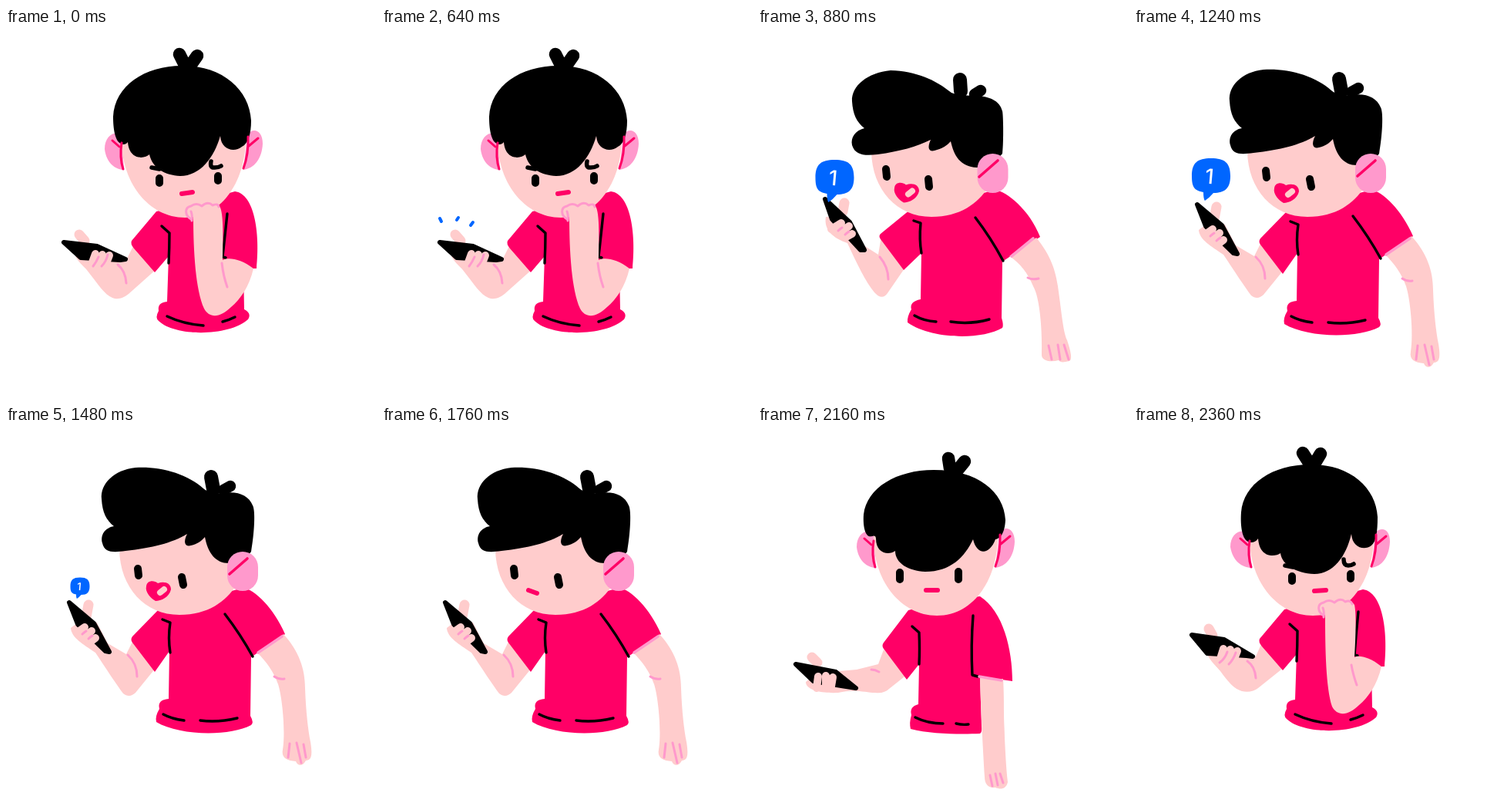
Recreate the animation shown at these times as an HTML page. Size 480x480 px, loop 2400 ms.

```html
<!DOCTYPE html>
<html lang="en">
<head>
<meta charset="utf-8">
<title>Waiting for a message</title>
<style>
  html, body { margin: 0; width: 100%; height: 100%; overflow: hidden; background: #fff; }
  svg { display: block; width: 100vw; height: 100vh; }
  path { stroke-linecap: round; stroke-linejoin: round; }
  text { font: 500 27px Inter, sans-serif; fill: #fff; text-anchor: middle; }
</style>
</head>
<body>
<svg id="stage" viewBox="0 0 480 480">
  <g id="body"></g>
  <g id="smile">
    <path fill="#f06" d="M182,208 C183,200 192,200 197,204 C206,201 214,204 214,212 C212,222 201,227 194,227 C188,224 180,215 182,208Z"/>
    <path stroke="#fcc" stroke-width="8" d="M200,216 L205,212"/>
  </g>
  <g id="sparks" fill="none" stroke="#06f" stroke-width="4">
    <path d="M75,247 L77,251 M99,246 L97,249 M118,252 L115,256"/>
  </g>
  <g id="bubble">
    <path fill="#06f" d="M100,169 C118,169 125,175 125,192 C125,208 118,214 103,214 Q98,220 92,224 Q90,222 90,213 C78,211 75,206 75,192 C75,175 82,169 100,169Z"/>
    <text x="98" y="202" transform="rotate(5 98 192)">1</text>
  </g>
</svg>
<script>
const SKIN = '#fcc', RED = '#f06', PINK = '#f9c', INK = '#000';
const LOOP = 2400, TICK = 40;
const byId = id => document.getElementById(id);
const fill = c => ({ fill: c });
const line = (c, w) => ({ fill: 'none', stroke: c, 'stroke-width': w });

// Poses: W worried, V worried leaning right, F front with arm down,
// S side view, T side view with arms swung out. A missing pose uses its base.
const base = { V: 'W', F: 'W', T: 'S' };

const parts = [
  // arm holding the phone
  { hand: 1, ...fill(SKIN),
    W: 'M165,283 L157,299 L138,300 L120,295 L105,292 L90,296 C95,306 103,310 108,318 C120,333 128,346 138,350 C145,353 153,350 159,345 L196,312Z',
    V: 'M165,283 L158,299 L140,300 L120,290 L105,286 L92,290 C97,303 105,310 112,318 C122,332 130,341 140,344 C148,346 156,344 161,340 L196,312Z',
    F: 'M163,290 L156,309 L128,316 L105,318 L80,318 L62,332 C62,342 80,347 104,346 C125,341 140,346 152,346 C160,347 166,345 170,341 L194,322Z',
    S: 'M164,280 L156,296 L132,282 L118,255 L100,250 L84,262 C85,275 100,283 116,294 C130,315 143,335 152,347 C158,352 164,350 168,346 L194,314Z',
    T: 'M160,270 L156,294 L134,280 L122,252 L104,246 L88,245 C85,262 98,273 116,279 C128,305 140,330 151,343 C158,351 164,350 168,344 L190,312Z' },
  { hand: 1, ...line(PINK, 3),
    W: 'M145,307 Q155,315 156,331', V: 'M147,305 Q157,312 158,327', F: 'M147,316 Q152,316 157,319',
    S: 'M158,297 Q170,308 170,325', T: 'M158,297 Q169,310 169,326' },
  { hand: 1, ...line(SKIN, 13),
    W: 'M95,268 L102,276', V: 'M97,263 L102,272', F: 'M70,300 L77,307',
    S: 'M107,232 L104,248', T: 'M112,227 L110,238' },
  { hand: 1, fill: INK, stroke: INK, 'stroke-width': 6,
    W: 'M75,278 L118,283 L155,300 L148,301 L97,298Z',
    V: 'M75,271 L117,277 L154,299 L146,298 L95,295Z',
    F: 'M49,309 L101,319 L127,340 L108,337 L72,331Z',
    S: 'M82,229 L114,256 L134,293 L129,292 L93,257Z',
    T: 'M87,222 L119,252 L138,288 L133,288 L96,248Z' },
  { hand: 1, ...line(SKIN, 10),
    W: 'M116,293 L112,304 M125,294 L121,306 M134,295 L129,308',
    V: 'M116,289 L112,302 M125,290 L121,303 M134,292 L129,305',
    F: 'M78,325 L76,340 M88,324 L88,340 M97,326 L95,338',
    S: 'M102,261 L92,268 M111,266 L100,275 M116,275 L108,281',
    T: 'M108,253 L95,261 M118,257 L106,266 M122,267 L113,272' },
  { hand: 1, ...line(PINK, 3),
    W: 'M120,297 Q117,304 113,309 M132,294 Q130,303 124,309',
    V: 'M121,293 Q118,302 111,307 M132,294 Q129,303 123,309',
    F: '',
    S: 'M104,266 Q101,268 99,270 M112,272 Q109,274 107,276',
    T: 'M109,259 Q106,261 104,263 M118,264 Q115,266 113,268' },

  // shirt
  { ...fill(RED),
    W: 'M195,238 L163,276 Q161,280 166,286 L193,317 L211,296 L209,355 Q196,356 198,367 Q193,376 198,380 C220,401 290,400 314,378 Q319,370 309,365 L308,312 L325,312 C330,265 322,215 297,212 L250,225Z',
    F: 'M195,239 L163,281 Q160,285 163,289 L193,329 L209,309 L208,361 Q196,364 199,375 Q196,385 198,393 C225,400 265,400 288,399 Q291,397 290,390 L288,325 L330,331 C330,290 318,240 288,221 L250,225Z',
    S: 'M200,236 L164,273 Q161,277 164,281 L193,319 L212,292 L211,354 Q196,355 199,367 Q193,377 195,384 C225,402 290,403 318,388 Q322,385 317,376 L318,300 L362,270 C347,235 322,212 308,210 L250,225Z',
    T: 'M197,236 L159,267 Q156,270 159,274 L189,314 L212,292 L211,352 Q196,355 199,365 Q193,375 194,382 C225,404 290,405 317,389 Q319,386 316,376 L317,303 L366,271 C352,235 322,212 308,210 L250,225Z' },
  { ...line(INK, 3.4),
    W: 'M202,257 L212,266 Q212,285 211,305 M287,241 Q284,270 281,297 L285,298 M209,374 Q230,384 256,386 M281,381 Q289,379 297,375',
    V: 'M202,257 L212,266 Q212,285 211,305 M291,241 Q288,270 286,297 L290,298 M209,374 Q230,384 256,386 M281,381 Q289,379 297,375',
    F: 'M200,260 L209,268 Q210,290 209,309 M279,246 Q276,285 278,323 L285,325 M204,378 Q220,386 240,386 M257,386 Q265,388 273,387',
    S: 'M203,251 L213,255 Q210,275 213,294 M284,244 Q304,270 320,299 L320,299 M204,374 Q215,380 231,382 M252,382 Q275,385 300,379',
    T: 'M202,250 L211,253 Q209,275 212,292 M282,246 Q302,272 318,302 L318,302 M203,373 Q215,380 231,381 M250,381 Q275,385 300,378' },

  // head, front view
  { ...fill(PINK),
    W: 'M150,138 C140,133 128,140 128,157 C130,175 142,184 153,184Z M313,138 C322,128 333,134 333,150 C332,170 322,182 308,184Z',
    V: 'M148,138 C137,133 125,140 125,157 C128,175 140,184 153,184Z M313,138 C322,130 332,134 332,150 C331,170 322,182 308,184Z' },
  { ...fill(SKIN),
    W: 'M150,140 C148,200 185,246 232,246 C282,246 312,195 311,140Z' },
  { ...line(INK, 16.5),
    W: 'M225,34 L231,46 M248,36 L241,46', V: 'M219,35 L226,46 M242,36 L236,46', F: 'M247,42 L249,55 M268,46 L259,57' },
  { ...fill(INK),
    W: 'M149,150 C140,146 139,125 139,115 C141,75 180,49 228,49 C280,48 316,80 318,120 C318,138 314,150 306,154 C296,162 279,158 278,140 C270,168 252,192 226,192 C206,191 190,182 186,164 C180,170 160,172 158,148 C156,151 152,152 149,150Z',
    V: 'M148,150 C139,146 138,125 139,112 C142,75 180,50 228,50 C280,49 314,80 316,118 C316,138 314,150 308,155 C299,162 283,158 282,140 C275,170 258,192 234,192 C210,191 192,180 190,165 C183,170 163,172 161,146 C158,151 152,152 148,150Z',
    F: 'M148,143 C139,146 136,130 137,115 C141,80 180,57 228,57 C285,57 319,85 321,122 C320,140 314,146 308,147 C300,168 284,168 279,147 C268,170 250,189 217,189 C195,188 178,178 178,162 C170,168 153,166 153,146 C153,142 150,142 148,143Z' },
  { ...line(RED, 3),
    W: 'M138,146 L147,154 M150,149 Q147,168 152,183 M327,143 L315,153 M314,141 Q315,163 308,182' },
  { ...line(INK, 5.5),
    W: 'M189,181 L199,183 M266,173 Q264,182 271,181 Q276,181 279,179',
    V: 'M196,181 L206,183 M272,173 Q272,181 278,181 Q282,181 285,179',
    F: '' },

  // head, side view
  { ...fill(SKIN),
    S: 'M147,160 C148,210 180,245 225,245 C262,245 285,228 300,205 L300,140 L150,140Z' },
  { ...line(INK, 18),
    S: 'M266,66 L269,82', T: 'M262,67 L263,82' },
  { ...line(INK, 14.5),
    S: 'M291,78 L282,83', T: 'M289,81 L281,86' },
  { ...fill(INK),
    S: 'M140,130 C128,132 122,142 125,152 C128,165 140,164 155,162 C190,158 215,152 235,140 C229,152 233,157 240,155 C248,153 254,149 258,144 C262,165 272,178 289,178 C300,178 312,172 318,163 C322,140 324,110 320,103 C315,90 300,84 283,87 C270,88 262,86 256,81 C235,62 200,52 168,54 C140,57 122,75 124,95 C125,112 130,122 140,130Z',
    T: 'M138,130 C126,133 120,142 122,152 C126,165 138,166 155,164 C185,160 205,154 224,145 C219,156 222,161 229,159 C238,157 246,152 250,147 C254,165 262,180 284,181 C297,181 310,172 317,163 C319,145 318,110 317,108 C314,95 302,90 288,88 C270,88 258,87 251,84 C230,67 205,56 172,55 C142,58 121,75 122,95 C123,112 128,122 138,130Z' },
  { ...line(PINK, 40), S: 'M307,183 L307,194', T: 'M304.5,183 L304.5,194' },
  { ...line(RED, 3.6), S: 'M290,192 L313,172', T: 'M287,193 L311,172' },

  // eyes and closed mouth
  { ...line(INK, 10),
    W: 'M199,195 L199,201 M275,192 L275,198', V: 'M205,195 L205,201 M281,192 L281,198',
    F: 'M184,190 L184,199 M260,189 L260,199',
    S: 'M171,185 L172,194 M228,196 L230,206', T: 'M166,183 L167,193 M221,196 L222,206' },
  { mouth: 1, ...line(RED, 6),
    W: 'M228,215 L242,213', V: 'M234,214 L249,213', F: 'M218,213 L233,213',
    S: 'M190,213 L201,217', T: 'M185,213 L196,217' },

  // free arm
  { ...fill(SKIN),
    W: 'M321,312 C316,335 304,352 292,362 C278,376 264,377 257,364 C246,340 243,290 243,245 C233,250 230,232 240,231 C252,223 272,224 278,233 C283,245 281,285 281,301 C288,297 305,299 321,312Z',
    V: 'M321,312 C316,335 304,352 292,362 C278,376 264,377 257,364 C249,340 248,290 248,245 C238,250 235,232 245,229 C256,221 278,221 286,232 C289,245 287,285 286,300 C291,297 305,299 321,312Z',
    F: 'M318,328 C319,345 319,360 319,372 C319,385 320,395 320,405 C321,425 322,445 324,462 C322,471 315,472 308,469 C300,470 294,466 294,455 C292,420 289,370 288,327 C298,328 308,329 318,328Z',
    S: 'M360,270 C380,292 388,315 388,340 C389,370 392,395 395,410 C398,428 396,434 389,434 C385,442 378,441 376,435 C364,434 357,430 359,420 C363,395 358,350 353,335 C347,318 337,305 326,294Z',
    T: 'M361,272 C380,295 386,315 389,335 C394,370 396,395 401,405 C406,420 408,430 404,432 C396,434 392,434 390,431 C380,434 369,432 368,425 C369,395 366,350 357,335 C350,318 340,305 326,296Z' },
  { ...line(PINK, 3),
    W: 'M240,248 C232,243 231,233 240,231 Q247,226 254,231 Q262,224 268,230 Q275,227 276,232 M240,238 Q242,243 241,250',
    V: 'M246,246 C238,241 237,231 246,229 Q253,224 260,229 Q268,222 274,228 Q281,225 283,231 M245,236 Q247,241 246,248',
    F: '', S: '' },
  { ...line(PINK, 3),
    W: '', F: 'M301,453 L304,467 M308,451 L311,466 M314,451 L318,463',
    S: 'M368,412 L366,430 M377,411 L383,437 M386,413 L389,430',
    T: 'M377,412 L381,430 M389,411 L392,430 M397,411 L403,430' },
  { ...line(PINK, 3),
    W: 'M280,305 Q282,322 287,336', V: 'M282,310 Q284,322 289,336', F: '',
    S: 'M348,325 Q354,329 361,328', T: 'M350,324 Q356,327 364,325' },
  { ...line(PINK, 3.6),
    W: '', F: 'M287,325 L316,330', S: 'M327,294 L358,273', T: 'M329,296 L357,273' },
];

// [time, pose, next pose, mix, mix of the phone arm]
const poses = [
  [0, 'W'], [760, 'W', 'F', .4, .1], [800, 'W', 'F', .94, .2],
  [840, 'S', 'T', .6], [880, 'T'],
  [920, 'T', 'S', .3], [960, 'T', 'S', .6], [1000, 'T', 'S', .82], [1040, 'T', 'S', .94], [1080, 'S'],
  [2080, 'S', 'T', .5], [2120, 'T'], [2160, 'F'],
  [2200, 'F', 'V', .25], [2240, 'F', 'V', .6], [2280, 'F', 'V', .88], [2320, 'F', 'V', .97], [2360, 'V'],
];
// [time, size]
const smileSize = [[0, 0], [840, .7], [880, 1], [1520, .85], [1560, .6], [1600, .35], [1640, 0]];
const sparkSize = [[0, 0], [640, 1], [720, 1.15], [760, 1.3], [800, 0]];
const bubbleSize = [[0, 0], [840, .5], [880, 1], [1280, 1.03], [1320, 1.07], [1360, 1.05],
  [1400, .95], [1440, .75], [1480, .5], [1520, .25], [1560, 0]];

const at = (table, t) => table.findLast(row => row[0] <= t);
const shape = (part, pose) => part[pose] ?? part[base[pose]] ?? '';

function blend(a, b, mix) {
  if (!a || !b) return mix < .5 ? a : b;
  const to = b.match(/[\d.]+/g);
  let i = 0;
  return a.replace(/[\d.]+/g, n => +(+n + (to[i++] - n) * mix).toFixed(2));
}

function scaleAt(id, x, y, sx, sy, dx = 0, dy = 0) {
  const el = byId(id);
  el.style.display = sy ? '' : 'none';
  el.setAttribute('transform', `translate(${x + dx} ${y + dy}) scale(${sx} ${sy}) translate(${-x} ${-y})`);
}

for (const part of parts) {
  part.el = document.createElementNS('http://www.w3.org/2000/svg', 'path');
  for (const key of ['fill', 'stroke', 'stroke-width'])
    if (part[key]) part.el.setAttribute(key, part[key]);
  byId('body').append(part.el);
}

function draw(t) {
  const [, from, to = from, mix = 0, handMix = mix] = at(poses, t);
  const smile = at(smileSize, t)[1], spark = at(sparkSize, t)[1], bubble = at(bubbleSize, t)[1];
  for (const part of parts) {
    const d = blend(shape(part, from), shape(part, to), part.hand ? handMix : mix);
    part.el.setAttribute('d', part.mouth && smile ? '' : d);
  }
  const swing = from === 'T' ? 1 - mix : to === 'T' ? mix : 0;
  scaleAt('smile', 197, 215, .6 + .4 * smile, smile, -5 * swing, -.5 * swing);
  scaleAt('sparks', 94, 280, spark, spark);
  scaleAt('bubble', 92, 224, bubble, bubble, -.5 * swing, 2 * swing);
}

let last = -1;
const start = performance.now();
function tick() {
  const t = Math.floor((performance.now() - start) % LOOP / TICK) * TICK;
  if (t !== last) draw(last = t);
  requestAnimationFrame(tick);
}
tick();
</script>
</body>
</html>
```
